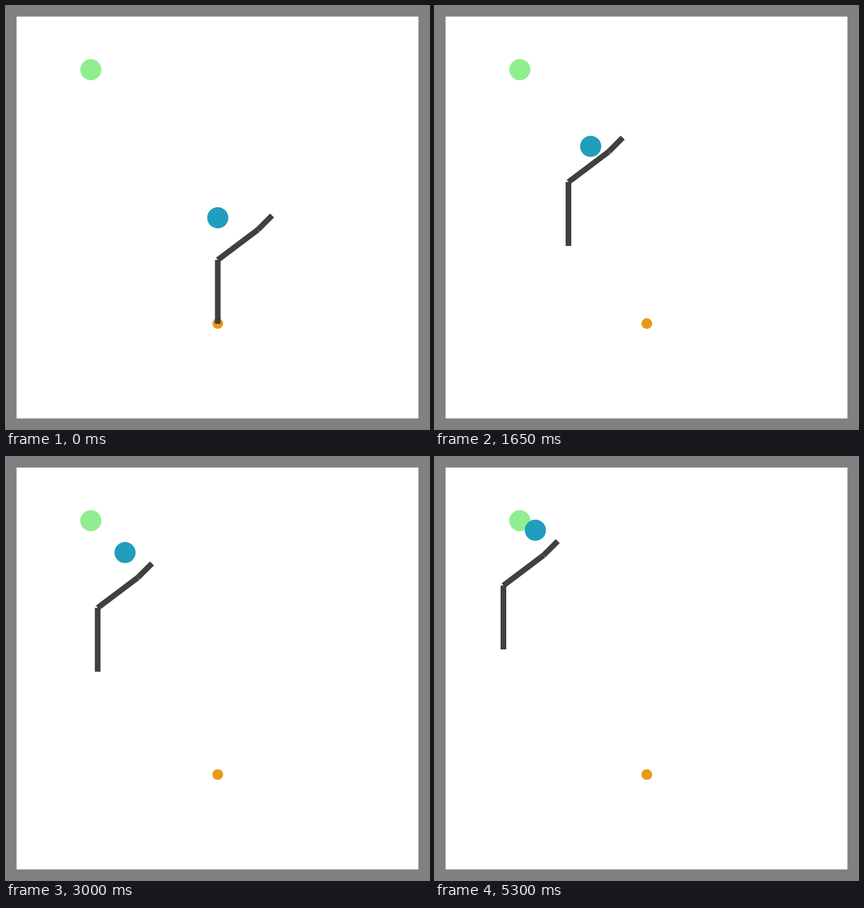
These frames come from a looping animation (748 px wide and 748 px high, 5.35 s). An HTML page:

```html
<!DOCTYPE html>
<html lang="en">
<head>
<meta charset="utf-8">
<title>Pushing arm</title>
<style>
  html, body { margin: 0; width: 100%; height: 100%; overflow: hidden; background: #808080; }
  svg { display: block; width: 748px; height: 748px; }
  #arm { stroke: #404040; stroke-width: 10; }
</style>
</head>
<body>
<svg viewBox="0 0 748 748">
  <rect width="748" height="748" fill="#808080"/>
  <rect x="18.7" y="18.7" width="710.6" height="710.6" fill="#fff"/>
  <circle cx="150" cy="112.6" r="18.7" fill="#90ee90"/>
  <circle cx="374.5" cy="561.5" r="9.5" fill="#e89a16"/>
  <circle id="ball" r="18.7" fill="#219ebc"/>
  <g id="arm">
    <path d="M0 0V-113"/>
    <path d="M0 -113L71 -166.5"/>
    <path d="M71 -166.5L96 -191.5"/>
  </g>
</svg>
<script>
const LOOP = 5350, STEP = 50, HOME = 374.5;

// Key poses; a negative push means the arm has yet to reach the ball
const poses = [
  { t: 0, x: 374.5, y: 562, push: -32 },
  { t: 550, x: 338.5, y: 512, push: 22 },
  { t: 1150, x: 282, y: 457, push: 81.5 },
  { t: 1650, x: 236, y: 424.3, push: 126.3 },
  { t: 2450, x: 184, y: 395.3, push: 181.3 },
  { t: 3600, x: 144.5, y: 364.3, push: 224.5 },
  { t: 4600, x: 127.6, y: 340.3, push: 235.5 },
  { t: 5300, x: 121, y: 340.3, push: 245 }
];

function slope(i, key) {
  const a = poses[Math.max(i - 1, 0)], b = poses[Math.min(i + 1, poses.length - 1)];
  return (b[key] - a[key]) / (b.t - a.t);
}

// Cubic Hermite curve through the key poses
function at(t, key) {
  const i = Math.max(poses.findIndex(p => p.t >= t) - 1, 0);
  const a = poses[i], b = poses[i + 1], span = b.t - a.t;
  const u = (t - a.t) / span, v = 1 - u;
  return a[key] * v * v * (1 + 2 * u) + b[key] * u * u * (3 - 2 * u)
    + span * u * v * (slope(i, key) * v - slope(i + 1, key) * u);
}

const arm = document.getElementById("arm"), ball = document.getElementById("ball");

function place(node, x, y) {
  node.setAttribute("transform", `translate(${x} ${y})`);
}

function draw(now) {
  const t = Math.floor((now % LOOP) / STEP) * STEP;
  place(arm, at(t, "x"), at(t, "y"));
  // The ball drifts slightly more sideways the farther it is pushed
  const push = Math.max(0, at(t, "push"));
  place(ball, HOME - push * (0.765 + 0.00016 * push), HOME - push);
}

const start = performance.now();
function tick() {
  draw(performance.now() - start);
  requestAnimationFrame(tick);
}
tick();
</script>
</body>
</html>
```
